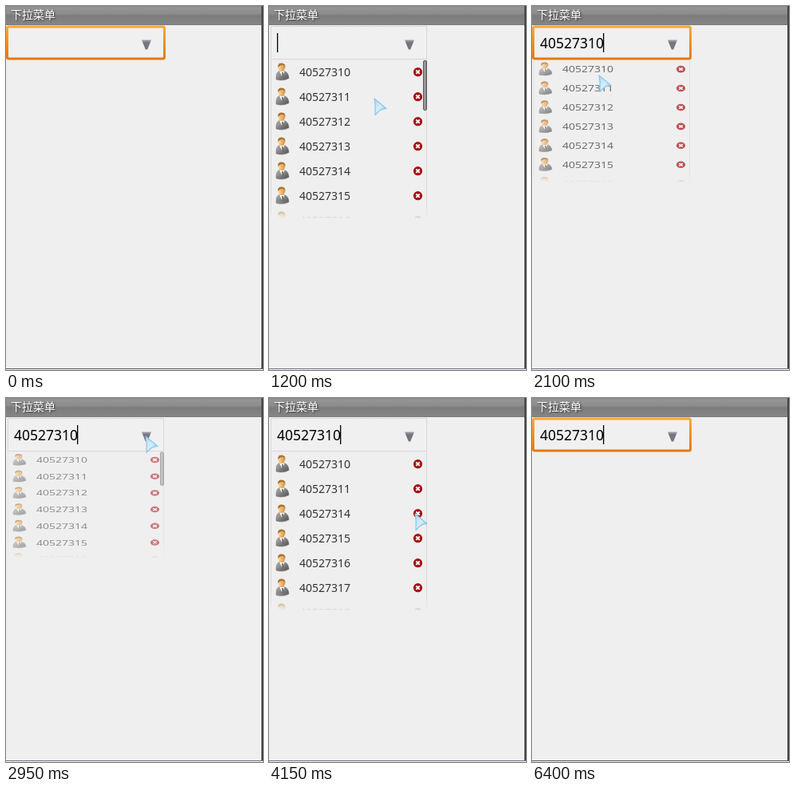
An HTML page that plays this animation: 322 px wide and 456 px high, repeating every 6.65 s.

```html
<!DOCTYPE html>
<html lang="zh">
<head>
<meta charset="utf-8">
<title>下拉菜单</title>
<style>
  html, body { margin: 0; width: 322px; height: 456px; overflow: hidden; background: #efefef; }
  svg { display: block; }
  text { font-family: "Noto Sans", "Open Sans", sans-serif; }
  .title { font: 14px "Noto Sans CJK SC", "Noto Sans CJK", sans-serif; fill: #fff; text-shadow: 1px 1px 2px #333; }
  .value { font-size: 17.5px; fill: #000; }
  .row text { font-size: 14px; fill: #333; }
</style>
</head>
<body>
<svg width="322" height="456" viewBox="0 0 322 456">
  <defs>
    <linearGradient id="bar" x2="0" y2="1">
      <stop offset="0" stop-color="#858585"/><stop offset=".08" stop-color="#959595"/>
      <stop offset=".4" stop-color="#8c8c8c"/><stop offset=".5" stop-color="#7c7c7c"/>
      <stop offset=".95" stop-color="#858585"/><stop offset="1" stop-color="#757575"/>
    </linearGradient>
    <linearGradient id="focus" x2="0" y2="1">
      <stop offset="0" stop-color="#f7a636"/><stop offset="1" stop-color="#e57a10"/>
    </linearGradient>
    <linearGradient id="tri" x2="0" y2="1">
      <stop offset="0" stop-color="#a5a5ad"/><stop offset=".3" stop-color="#74747e"/><stop offset="1" stop-color="#777780"/>
    </linearGradient>
    <linearGradient id="skin" x2="1"><stop offset="0" stop-color="#ffdca0"/><stop offset="1" stop-color="#d98f3c"/></linearGradient>
    <linearGradient id="suit" x2="1" y2="1"><stop offset="0" stop-color="#b5b5b5"/><stop offset="1" stop-color="#4c4c4c"/></linearGradient>
    <linearGradient id="ice" x2="1" y2="1"><stop offset="0" stop-color="#a5d8f5"/><stop offset=".5" stop-color="#d5effc"/><stop offset="1" stop-color="#68b5e4"/></linearGradient>
    <linearGradient id="thumbFill" x2="1"><stop offset="0" stop-color="#a8a8a8"/><stop offset="1" stop-color="#858585"/></linearGradient>
    <linearGradient id="fade" gradientUnits="userSpaceOnUse" x1="0" y1="244" x2="0" y2="267">
      <stop offset="0" stop-color="#fff"/><stop offset="1" stop-color="#000"/>
    </linearGradient>
    <mask id="edge" maskUnits="userSpaceOnUse" x="0" y="67" width="200" height="199">
      <rect y="67" width="200" height="199" fill="url(#fade)"/>
    </mask>
    <g id="person">
      <path d="M9 92q-.5-9 4-10.500h6q5.500 1.500 6 9-7 4-16 1.500z" fill="url(#suit)" stroke="#777" stroke-width=".6"/>
      <path d="M13 81.500l3.500 7 3-7z" fill="#fff"/>
      <path d="M16 83l1.600 0 .5 5-1.500 1.500z" fill="#666"/>
      <ellipse cx="15.700" cy="77" rx="4.200" ry="5.300" fill="url(#skin)"/>
      <path d="M11.300 77q-1-5.500 4.500-5.500 5.500 0 4.600 6.500-.7-3.500-2.500-4-4-.5-6.600 3z" fill="#a8742e"/>
    </g>
    <g id="remove">
      <circle cx="186.500" cy="82.700" r="5.600" fill="#a90e12"/>
      <path d="M184.300 80.500l4.400 4.400m0-4.400l-4.400 4.400" stroke="#fff" stroke-width="1.900"/>
    </g>
  </defs>

  <rect width="322" height="456" fill="#efefef"/>
  <rect width="320" height="24" fill="url(#bar)"/>
  <text class="title" x="6" y="16">下拉菜单</text>
  <rect x="320" width="2" height="455" fill="#444"/>
  <rect id="base" y="454" width="322" height="1"/>
  <rect y="455" width="322" height="1" fill="#fafafa"/>

  <path id="plain" d="M2.500 66.500V25.500H197.500V66.500z" fill="#f0f0f0" stroke="#ddd3dd"/>
  <rect id="ring" x="1.500" y="26" width="197" height="40" rx="2" fill="#f0f0f0" stroke="url(#focus)" stroke-width="3"/>
  <path d="M170 42.500h12l-4.800 12h-2.400z" fill="url(#tri)"/>
  <text id="value" class="value" x="10" y="53"></text>
  <rect id="caret" y="34" width="1.300" height="24"/>

  <g id="list">
    <g mask="url(#edge)">
      <path d="M2.500 67V266M197.500 67V266" stroke="#ddd5dd"/>
      <g id="rows"></g>
    </g>
    <rect id="thumb" x="193.500" y="68.500" width="4" rx="1.500" fill="url(#thumbFill)" stroke="#555"/>
  </g>

  <path id="pointer" d="M1 1L16 13.500Q11 14 8.500 15.500T2 21.500Q3 11 1 1z" fill="url(#ice)" stroke="#8cc4e6" stroke-width="1.200" stroke-linejoin="round"/>
</svg>
<script>
const LOOP = 6650, STEP = 50, PITCH = 31, TOP = 67, VIEW = 199;
const FIRST = 40527310, COUNT = 20;
const removals = [3650, 4050, 4450];

// [time, x, y]
const path = [
  [200, 285, 250], [750, 174, 52], [850, 174, 52], [1200, 131, 115], [1550, 93, 86], [1750, 83, 86],
  [2350, 83, 86], [2800, 174, 47], [2950, 174, 47], [3450, 180, 146], [3600, 182, 144],
  [4750, 182, 144], [4800, 190, 146], [5250, 190, 146], [5300, 227, 168],
  [5500, 227, 168], [5750, 235, 170], [6050, 235, 170]
];
// [time, amount open]
const closing = [[5300, 1], [5500, .48], [5600, .48], [5650, .2], [5700, .2], [5750, 0]];

const $ = id => document.getElementById(id);
const clamp = v => Math.max(0, Math.min(1, v));
const between = (t, a, b) => t >= a && t < b;
const show = (id, on) => $(id).setAttribute('visibility', on ? 'visible' : 'hidden');

function sample(keys, t, k) {
  const i = keys.findIndex(key => key[0] > t);
  if (i < 0) return keys[keys.length - 1][k];
  if (i === 0) return keys[0][k];
  const a = keys[i - 1], b = keys[i];
  return a[k] + (b[k] - a[k]) * (t - a[0]) / (b[0] - a[0]);
}

function openness(t) {
  const grow = start => 1 - (1 - clamp((t - start) / 270)) ** 2;
  if (t < 1900) return grow(850);
  if (t < 2900) return 1 - clamp((t - 1900) / 350) ** 1.4;
  return t < 5300 ? grow(2900) : sample(closing, t, 1);
}

function thumbAlpha(t) {
  if (t < 1900) return 1 - clamp((t - 1300) / 250);
  return t < 2900 ? 0 : 1 - clamp((t - 3900) / 250);
}

for (let i = 0; i < 7; i++) {
  $('rows').insertAdjacentHTML('beforeend',
    `<g class="row" transform="translate(0 ${i * PITCH})"><use href="#person"/><text x="38" y="88"></text><use href="#remove"/></g>`);
}
const labels = document.querySelectorAll('.row text');

function draw(t) {
  const chosen = t >= 1900;
  const focused = t < 800 || between(t, 1900, 2800) || t >= 5350;
  show('ring', focused);
  show('plain', !focused);
  $('value').textContent = chosen ? FIRST : '';
  $('caret').setAttribute('x', chosen ? 89 : 10);
  show('caret', t >= 50 && !between(t, 5500, 6000));
  $('base').setAttribute('fill', between(t, 200, 6400) ? '#6c7080' : '#555');

  const open = openness(t);
  show('list', open > 0);
  $('list').setAttribute('opacity', open ** .6);
  $('list').setAttribute('transform', `translate(0 ${TOP}) scale(1 ${.5 + .5 * open}) translate(0 ${-TOP})`);

  const removed = removals.filter(r => t >= r).length;
  labels.forEach((label, i) => label.textContent = FIRST + i + (i > 1 ? removed : 0));
  $('thumb').setAttribute('height', VIEW * VIEW / (PITCH * (COUNT - removed)) - 2);
  $('thumb').setAttribute('opacity', thumbAlpha(t));

  show('pointer', between(t, 200, 6050));
  $('pointer').setAttribute('transform', `translate(${sample(path, t, 1)} ${sample(path, t, 2)})`);
}

const start = performance.now();
function tick() {
  const t = (performance.now() - start) % LOOP;
  draw(Math.floor(t / STEP) * STEP);
  requestAnimationFrame(tick);
}
tick();
</script>
</body>
</html>
```
